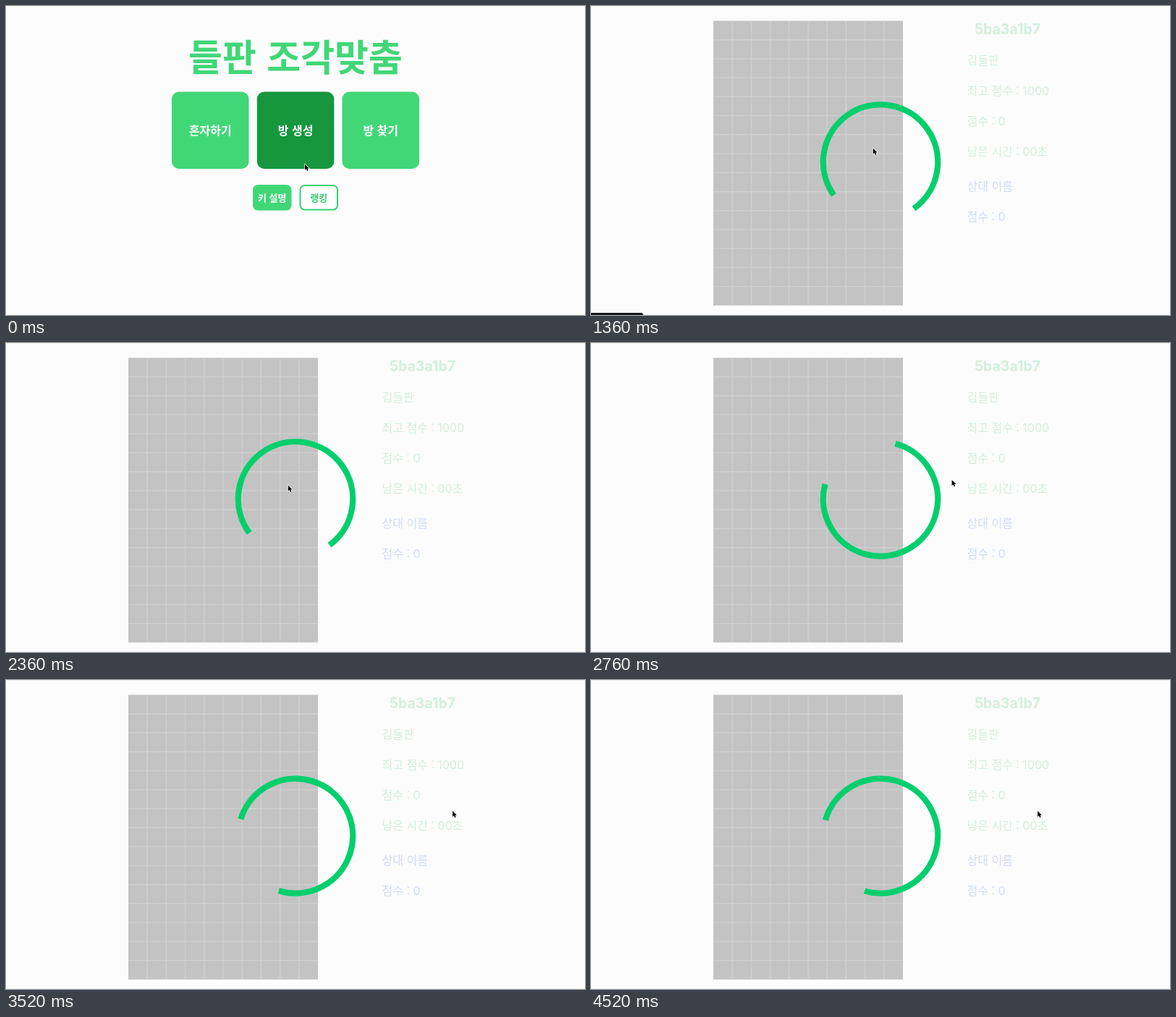
Recreate the animation shown at these times as an HTML page. Size 800 px wide and 427 px high, loop 4550 ms.

```html
<!DOCTYPE html>
<html lang="ko">
<head>
<meta charset="utf-8">
<style>
  html, body { margin: 0; width: 100%; height: 100%; overflow: hidden; background: #fcfcfc; }
  svg { display: block; width: 800px; height: 427px; font: 16px "Noto Sans CJK KR", "Noto Sans CJK JP", sans-serif; }
  .latin { font-family: Inter, sans-serif; }
  #menu text { font-weight: 700; text-anchor: middle; }
</style>
</head>
<body>
<svg viewBox="0 0 800 427">
  <path d="M0 .5H800M0 426.5H800" stroke="#f1f1f1"/>
  <g id="menu">
    <text x="400" y="89.5" font-size="51" fill="#41d777">들판 조각맞춤</text>
  </g>
  <g id="game">
    <rect x="169" y="20.5" width="262" height="393.3" fill="#c3c3c3"/>
    <path id="grid" stroke="#cfcfcf" stroke-width="1.4"/>
    <text class="latin" x="575.5" y="39" font-size="19.5" font-weight="700" text-anchor="middle" fill="#d2f0db">5ba3a1b7</text>
    <g id="info"></g>
    <circle id="spinner" cx="400" cy="215.5" r="79.2" fill="none" stroke="#03cf6c" stroke-width="8.2"
      pathLength="360" stroke-dasharray="270 90"/>
  </g>
  <path id="status" d="M0 424H69Q72 424 72 427H0Z" fill="#1c1c1c"/>
  <path id="cursor" d="M0 0V8L1.9 6.3 3.2 9.2 4.6 8.6 3.4 5.8H5.8Z" stroke="#fff" stroke-width="1.2" paint-order="stroke"/>
</svg>
<script>
const LOOP = 4550, FRAMES = 150, STEP = LOOP / FRAMES;
const GAME_START = 1300;
const GREEN = '#41d777';
const $ = id => document.getElementById(id);
const add = (id, markup) => $(id).insertAdjacentHTML('beforeend', markup);

function button(x, y, w, h, radius, label, size, fill, ink = '#fff', border = 'none') {
  add('menu', `<rect x="${x}" y="${y}" width="${w}" height="${h}" rx="${radius}" fill="${fill}" stroke="${border}" stroke-width="2"/>
    <text x="${x + w / 2}" y="${y + h / 2 + size * .38}" font-size="${size}" fill="${ink}">${label}</text>`);
}
button(229, 118.5, 106.5, 106.5, 10, '혼자하기', 16, GREEN);
button(346.8, 118.5, 106.5, 106.5, 10, '방 생성', 16, '#16973e');
button(464.5, 118.5, 106.5, 106.5, 10, '방 찾기', 16, GREEN);
button(341, 247, 53.5, 35.5, 7, '키 설명', 13, GREEN);
button(406.5, 248, 51.5, 33.5, 6, '랭킹', 13, '#fff', '#35cc70', '#35d273');

function info(y, label, color = '#d2f0db') {
  const text = label.replace(/\d+/g, '<tspan class="latin">$&</tspan>');
  add('info', `<text x="519.5" y="${y}" fill="${color}">${text}</text>`);
}
info(81, '김들판');
info(123, '최고 점수 : 1000');
info(165, '점수 : 0');
info(207, '남은 시간 : 00초');
info(255, '상대 이름', '#d0dcf8');
info(297, '점수 : 0', '#d0dcf8');

let grid = '';
for (let i = 1; i < 10; i++) grid += `M${169 + i * 26.2} 20.5v393.3`;
for (let i = 1; i < 15; i++) grid += `M169 ${20.5 + i * 26.22}h262`;
$('grid').setAttribute('d', grid);

// Eased 0..1 progress between two times
function ease(t, from, to) {
  const p = Math.min(1, Math.max(0, (t - from) / (to - from)));
  return p * p * (3 - 2 * p);
}

function draw(time) {
  const frame = Math.floor(time % LOOP / STEP + .25) % FRAMES;
  const t = frame * STEP;
  const playing = t >= GAME_START;
  $('menu').style.display = playing ? 'none' : '';
  $('game').style.display = playing ? '' : 'none';

  // The arc begins 45 degrees past the top, where a circle's dash starts 90 degrees later
  const turn = 286 + 10.88 * (frame - 58);
  $('spinner').setAttribute('transform', `rotate(${turn} 400 215.5)`);

  const click = ease(t, 30, 520), leave = ease(t, 2600, 2930);
  const x = 413 - 23.2 * click + 227.2 * leave;
  const y = 218.7 - 22 * click - 15.7 * leave;
  $('cursor').setAttribute('transform', `translate(${x} ${y})`);
  $('status').setAttribute('opacity', t < 900 ? 0 : 1 - ease(t, 1560, 1800));
}

const start = performance.now();
(function tick() {
  draw(performance.now() - start);
  requestAnimationFrame(tick);
})();
</script>
</body>
</html>
```
